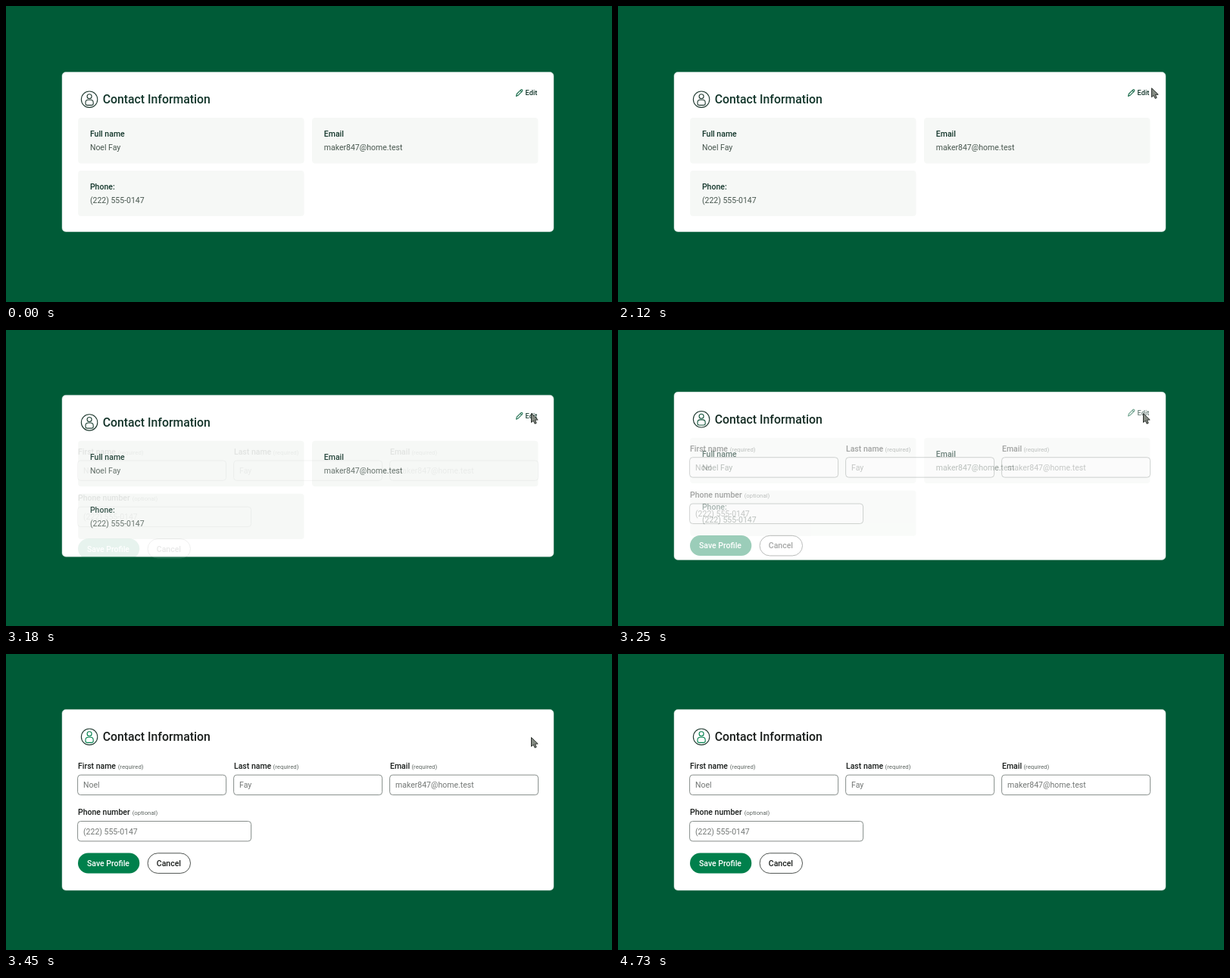
An HTML page for the animation above (6.25 s loop, 800 px wide and 392 px high).

```html
<!DOCTYPE html>
<html lang="en">
<head>
<meta charset="utf-8">
<title>Contact card</title>
<style>
html, body { margin: 0; width: 100%; height: 100%; overflow: hidden; background: #005b37; }
svg { display: block; width: 100%; height: 100%; }
text { font: 400 10.5px Roboto, sans-serif; }
.title { font-size: 15.8px; font-weight: 500; }
.label { font-weight: 500; }
.edit { font-size: 9.25px; font-weight: 500; }
.note { font-size: 7.8px; fill: #5c6460; }
#view { fill: #12352a; }
#view .value { fill: #48574f; }
#form { fill: #191d1b; }
#form .value { fill: #737775; }
.panel { fill: #f6f8f6; }
.input { fill: #fff; stroke: #7a827e; stroke-width: .9; }
.line { fill: none; stroke-width: 1.1; stroke-linejoin: round; stroke-linecap: round; }
.pointer { fill: #858b83; stroke: #2b302d; stroke-width: 1; stroke-linejoin: round; }
</style>
</head>
<body>
<svg viewBox="0 0 800 392" preserveAspectRatio="none">
  <rect width="800" height="392" fill="#005b37"/>
  <rect id="card" x="74" width="649" rx="5" fill="#fff" stroke="#b9cfc4" stroke-width=".5"/>
  <g id="view">
    <g class="line" stroke="#176b4a" stroke-width=".9">
      <path d="M673.6 119.4l.7-2.9 5.6-5.6q.8-.6 1.6.1.8.9.1 1.7l-5.6 5.6ZM679 111.9l1.9 1.9"/>
    </g>
    <text class="edit" x="685.6" y="118.3">Edit</text>
  </g>
  <g id="form">
    <rect x="95" y="263.5" width="81.3" height="27" rx="13.5" fill="#00804c"/>
    <text class="label" x="107" y="280.8" fill="#fff">Save Profile</text>
    <rect x="187.1" y="263.8" width="56.4" height="26.6" rx="13.3" fill="#fff" stroke="#3b413e" stroke-width=".9"/>
    <text class="label" x="198.8" y="280.8">Cancel</text>
  </g>
  <g id="head">
    <g class="line">
      <circle cx="110.1" cy="123.7" r="10.7" stroke="#1f3a30"/>
      <g id="person">
        <circle cx="110.1" cy="119.7" r="3"/>
        <path d="M105 129.2v-1.3q0-3.6 3.6-3.6h3q3.6 0 3.6 3.6v1.3q0 2.2-2.2 2.2h-5.8q-2.2 0-2.2-2.2Z"/>
      </g>
    </g>
    <text class="title" id="title" x="127.7" y="129.4">Contact Information</text>
  </g>
  <circle id="click" cx="693" cy="111" r="9" fill="#fff34f" opacity=".86"/>
  <path id="hand" class="pointer" d="M692 111.5q1.2-.9 2 .4l1.1 3 3.4-.3q1.5.2 1.8 1.6l.4 4.2q0 2-1.6 3.2l-1.4 1.8h-5.2l-1-2-3-3.8q-1-1.5.2-2 1-.3 1.8.8l1.2 1.1-1.1-6.7q0-.9 1.4-1.3ZM695.1 115l.6 2.4M697.5 114.8l.6 2.4"/>
  <path id="arrow" class="pointer" d="M.5.5V12.4L3.2 10.1 5.2 14.2 7.2 13.2 5.4 9.2 9.2 8.9Z"/>
</svg>
<script>
const LOOP = 6250;
const RISE = 14;
const person = { first: 'Noel', last: 'Fay', email: 'maker847@home.test', phone: '(222) 555-0147' };
const $ = id => document.getElementById(id);

function add(parent, tag, attrs, content = '') {
  const node = document.createElementNS(parent.namespaceURI, tag);
  for (const key in attrs) node.setAttribute(key, attrs[key]);
  node.textContent = content;
  parent.append(node);
  return node;
}

function panel(x, y, label, value) {
  const view = $('view');
  add(view, 'rect', { class: 'panel', x, y, width: 298.3, height: 60.3, rx: 4 });
  add(view, 'text', { class: 'label', x: x + 15.7, y: y + 25.1 }, label);
  add(view, 'text', { class: 'value', x: x + 15.7, y: y + 42.9 }, value);
}

function field(x, y, width, label, note, noteX, value) {
  const form = $('form');
  add(form, 'text', { class: 'label', x, y: y + 4 }, label);
  add(form, 'text', { class: 'note', x: noteX, y: y + 4 }, `(${note})`);
  add(form, 'rect', { class: 'input', x: x - .4, y: y + 12.2, width, height: 26.4, rx: 4 });
  add(form, 'text', { class: 'value', x: x + 7, y: y + 29.3 }, value);
}

panel(95.2, 148.1, 'Full name', `${person.first} ${person.last}`);
panel(404.1, 148.1, 'Email', person.email);
panel(95.2, 217.9, 'Phone:', person.phone);
field(95, 148, 196, 'First name', 'required', 147.7, person.first);
field(301, 148, 196, 'Last name', 'required', 352.6, person.last);
field(507, 148, 196, 'Email', 'required', 535.4, person.email);
field(95, 209.3, 229, 'Phone number', 'optional', 166.7, person.phone);

// time, x, y; a row without a place hides the arrow
const arrowSteps = [
  [0], [1650, 798, 147], [1720, 790, 141], [1780, 778, 133], [1850, 763, 126],
  [1920, 747, 119], [1980, 731, 114], [2050, 716, 110], [2120, 704, 108.3],
  [2180, 697, 109], [2250, 693, 110], [2320], [3180, 693, 110],
  [4380, 696, 109], [4450, 708, 104], [4520, 728, 98], [4580, 752, 95],
  [4650, 777, 93], [4730]
];
const handSteps = [[0], [2320, 2, 0], [2380, 0, 0], [3180]];
const morphSteps = [[0, 0], [3180, .09], [3250, .39], [3320, .74], [3380, .95], [3450, 1]];

const stepAt = (steps, t) => steps.findLast(step => step[0] <= t);
const mix = (a, b, p) => `rgb(${a.map((v, i) => Math.round(v + (b[i] - v) * p))})`;
const shift = (node, x, y) => node.setAttribute('transform', `translate(${x} ${y})`);

function place(node, [, x, y]) {
  node.style.display = x === undefined ? 'none' : '';
  if (x !== undefined) shift(node, x, y);
}

function draw(t) {
  const p = stepAt(morphSteps, t)[1];
  $('card').setAttribute('y', 87.5 - RISE * p);
  $('card').setAttribute('height', 211.5 + 2 * RISE * p);
  shift($('head'), 0, -RISE * p);
  shift($('view'), 0, -RISE * p);
  shift($('form'), 0, RISE * (1 - p));
  $('view').style.opacity = 1 - p;
  $('form').style.opacity = p;
  $('title').style.fill = mix([18, 53, 42], [25, 29, 27], p);
  $('person').style.stroke = mix([31, 58, 48], [0, 128, 76], p);
  $('click').style.display = t >= 2920 && t < 3050 ? '' : 'none';
  place($('hand'), stepAt(handSteps, t));
  place($('arrow'), stepAt(arrowSteps, t));
}

const start = performance.now();
function tick() {
  draw((performance.now() - start) % LOOP);
  requestAnimationFrame(tick);
}
tick();
</script>
</body>
</html>
```
